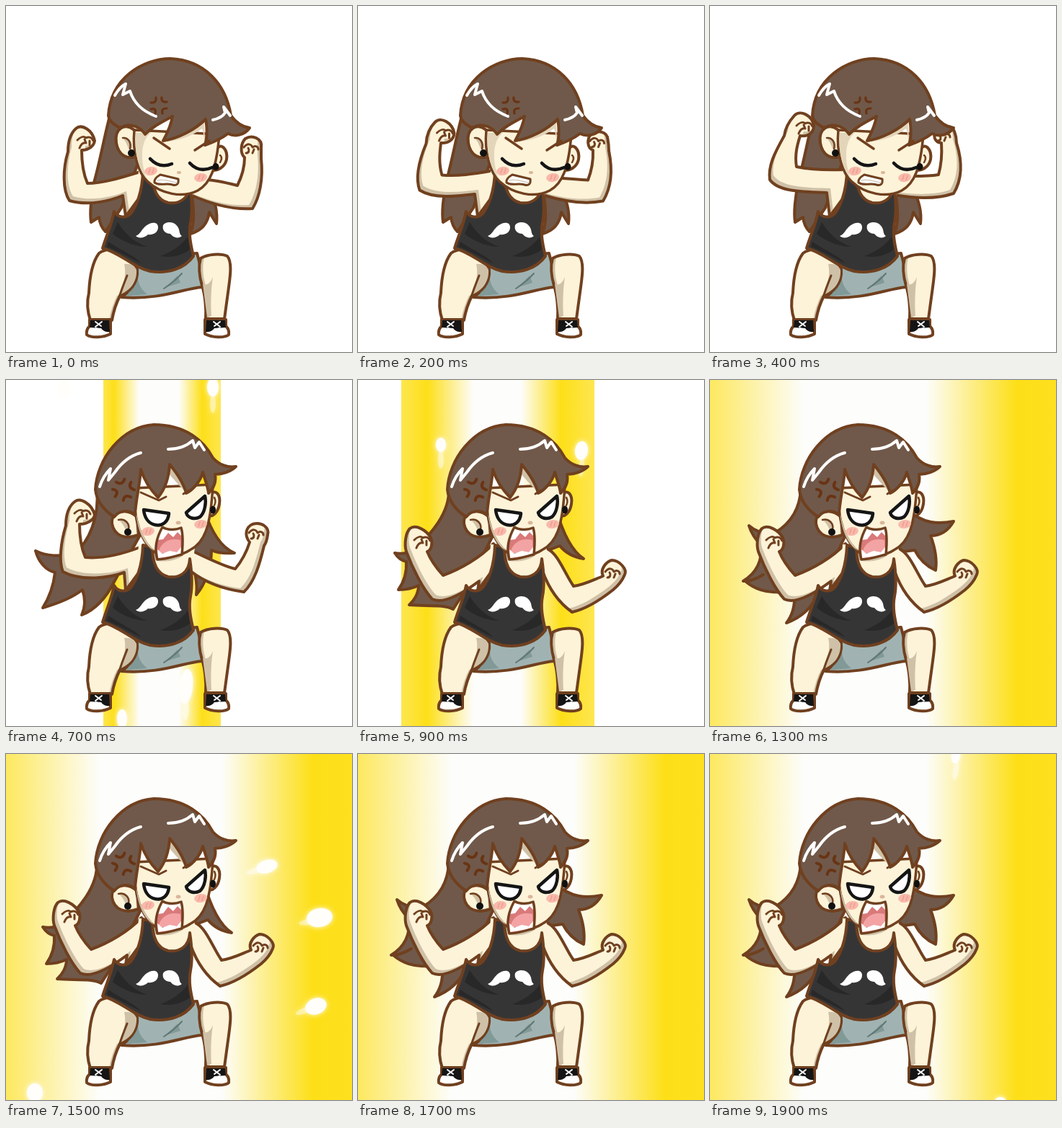
Write an HTML page with a canvas that moves like this. It is 480 by 480 pixels and loops after 2 s.

```html
<!DOCTYPE html>
<html lang="en">
<head>
<meta charset="utf-8">
<title>Power up</title>
<style>
  html, body { margin: 0; width: 100%; height: 100%; overflow: hidden; background: #fff; }
  canvas { display: block; width: 100vw; height: 100vh; }
</style>
</head>
<body>
<canvas id="stage" width="480" height="480"></canvas>
<script>
const ctx = document.getElementById('stage').getContext('2d');
ctx.lineCap = ctx.lineJoin = 'round';

const LINE = '#70401f', SKIN = '#fdf3d9', SHADE = '#cfc1a7', HAIR = '#70594a',
      SHIRT = '#363535', FOLD = '#282828', SHORTS = '#a0b3b2', BLUSH = '#f8b9ab',
      EDGE = '#fee650', YELLOW = '#fddf18', GLOW = '#fdfdfb';

const mix = (a, b, t) => a + (b - a) * t;

function mixPath(a, b, t) {
  const to = b.match(/-?[\d.]+/g);
  let i = 0;
  return a.replace(/-?[\d.]+/g, n => mix(+n, +to[i++], t).toFixed(2));
}

function fill(d, color) {
  ctx.fillStyle = color;
  ctx.fill(new Path2D(d));
}

function line(d, color = LINE, width = 4) {
  ctx.strokeStyle = color;
  ctx.lineWidth = width;
  ctx.stroke(new Path2D(d));
}

function shape(d, color, width = 4) {
  fill(d, color);
  line(d, LINE, width);
}

function oval(x, y, rx, ry, color, tilt = 0) {
  ctx.fillStyle = color;
  ctx.beginPath();
  ctx.ellipse(x, y, rx, ry, tilt, 0, Math.PI * 2);
  ctx.fill();
}

// Skin with a darker rim left uncovered by a shifted copy of the same shape.
function shaded(d, dx, dy) {
  ctx.save();
  ctx.clip(new Path2D(d));
  fill(d, SHADE);
  ctx.translate(dx, dy);
  fill(d, SKIN);
  ctx.restore();
  line(d);
}

function at(x, y, draw) {
  ctx.save();
  ctx.translate(x, y);
  draw();
  ctx.restore();
}

const leftArm = {
  up: { fist: [105, 184], d: 'M186,230 C160,238 135,246 113,246 C106,230 105,215 105,200 C115,200 122,194 123,187 C120,172 105,163 97,170 C88,178 86,190 86,202 C79,225 78,255 88,270 C115,278 145,270 162,263 L166,292 L188,262' },
  tense: { fist: [126, 164], d: 'M186,227 C160,228 140,227 120,223 C117,205 122,190 125,180 C138,182 144,174 144,166 C142,152 125,143 117,152 C108,162 104,172 103,180 C92,200 80,220 83,241 C95,258 130,258 162,259 L166,292 L188,262' },
  yell: { fist: [101, 183], d: 'M186,232 C160,242 132,248 110,246 C103,230 102,215 102,200 C113,200 122,194 123,187 C119,172 103,162 95,169 C85,177 83,190 83,202 C76,225 73,252 79,266 C105,280 145,274 164,267 L166,292 L188,262' },
  low: { fist: [84, 220], d: 'M188,227 C170,246 143,262 118,271 C108,260 100,248 96,238 C102,236 104,226 101,219 C95,208 80,200 72,206 C66,212 64,228 67,238 C76,262 90,290 103,304 C120,312 148,294 168,279 L166,292 L188,262' }
};

const rightArm = {
  up: { fist: [342, 195], d: 'M262,240 C285,240 305,245 321,249 C328,235 331,222 331,210 C324,204 326,190 332,184 C342,178 356,184 354,196 C354,201 354,206 354,212 C357,240 352,265 342,281 C315,283 285,275 256,262' },
  tense: { fist: [325, 178], d: 'M262,236 C285,236 300,237 317,234 C321,220 322,205 321,190 C311,189 309,180 314,172 C322,164 336,165 339,174 C341,179 342,184 342,190 C350,215 350,240 338,260 C315,268 285,267 256,262' },
  yell: { fist: [349, 211], d: 'M252,234 C275,245 300,258 318,262 C328,250 334,238 338,225 C330,215 333,204 342,200 C355,196 366,205 363,215 C362,222 361,226 358,230 C352,255 345,280 330,294 C300,290 275,280 256,265' },
  low: { fist: [355, 265], d: 'M254,231 C276,234 284,264 299,286 C314,284 327,277 340,272 C335,262 345,252 352,250 C362,250 374,262 370,270 C366,280 360,286 354,291 C335,306 315,318 297,322 C280,310 265,290 256,265' }
};

const calmHair = [
  'M150,130 C138,170 132,210 122,245 C118,270 116,285 118,300 L129,293 C130,302 133,308 138,313 L160,280 L190,200Z',
  'M255,250 C262,280 262,300 256,316 C270,312 280,302 282,286 L292,302 C294,285 290,270 280,250Z'
];

const yellHair = [
  [
    'M126,150 C130,190 115,225 95,240 C75,246 55,244 41,237 C45,252 55,264 68,267 C66,285 60,302 51,316 C72,310 92,302 106,291 C110,302 110,315 105,326 C125,318 140,300 150,280 L200,190Z',
    'M275,180 C285,212 298,232 317,240 C303,241 293,240 285,236 C285,262 275,285 264,298 C266,282 262,262 254,245Z'
  ], [
    'M126,150 C128,185 100,215 78,235 C68,241 60,242 51,240 C56,248 62,251 67,252 C68,268 64,280 56,291 C66,291 76,289 84,285 C84,296 78,306 71,312 C95,314 120,311 132,318 L150,290 L200,190Z',
    'M275,180 C285,215 298,238 313,248 C300,246 288,240 280,230 L254,240Z'
  ], [
    'M126,150 C125,180 110,200 90,212 C75,214 63,210 54,202 C58,215 64,222 70,228 C74,250 64,268 46,279 C56,279 66,275 74,270 C66,276 58,278 50,280 C62,290 78,295 92,294 C102,298 110,298 117,298 C118,315 114,327 106,337 C125,330 141,318 150,296 L200,190Z',
    'M275,180 C295,200 318,200 338,196 C330,210 318,216 306,216 C312,232 315,250 313,264 C300,258 290,248 284,236 L254,240Z'
  ]
];

// Beam: left edge, yellow until, white from, white until, yellow from, right edge.
const beamKeys = [
  [6, [175, 183, 202, 238, 256, 270]],
  [7, [135, 150, 185, 240, 272, 298]],
  [9, [60, 96, 160, 226, 282, 328]],
  [11, [-110, -30, 128, 225, 330, 422]],
  [13, [-160, -60, 130, 300, 425, 900]]
];

// step, x, y, radii, tilt
const sparks = [
  [7, 287, 10, 8, 13, 0], [7, 250, 425, 9, 24, .1], [7, 161, 470, 7, 13, 0], [7, 80, 12, 9, 15, .1],
  [9, 115, 90, 7, 10, 0], [9, 310, 98, 9, 13, .1],
  [11, 100, 118, 13, 17, .3], [11, 29, 242, 8, 13, .3], [11, 11, 284, 9, 21, .2],
  [11, 15, 443, 10, 18, .2], [11, 92, 356, 15, 20, 0], [11, 322, 387, 7, 13, .3],
  [15, 362, 156, 9, 15, 1.3], [15, 435, 227, 13, 18, 1.4], [15, 430, 350, 11, 15, 1.2], [15, 40, 470, 11, 13, 0],
  [19, 341, 3, 6, 10, .2], [19, 403, 480, 7, 4, 0]
];

function beam(step) {
  if (step < 6) return;
  let i = 0;
  while (i < beamKeys.length - 2 && step >= beamKeys[i + 1][0]) i++;
  const [s0, from] = beamKeys[i], [s1, to] = beamKeys[i + 1];
  const t = Math.min(1, (step - s0) / (s1 - s0));
  const xs = from.map((x, n) => mix(x, to[n], t));
  const left = xs[0], right = xs[5];
  const paint = ctx.createLinearGradient(left, 0, right, 0);
  [EDGE, YELLOW, GLOW, GLOW, YELLOW, EDGE].forEach((color, n) =>
    paint.addColorStop((xs[n] - left) / (right - left), color));
  ctx.fillStyle = paint;
  ctx.fillRect(left, 0, right - left, 480);
}

function drawSparks(step) {
  ctx.save();
  ctx.shadowColor = '#fff';
  ctx.shadowBlur = 7;
  for (const [s, x, y, rx, ry, tilt] of sparks) {
    const age = step - s;
    if (Math.abs(age) > 1) continue;
    const px = x + age * 8 * Math.sign(x - 215), py = y - age * 190;
    oval(px, py, rx, ry, '#fffefa', tilt);
    const [tx, ty] = tilt > 1 ? [-16, 6] : [0, ry + 10];
    oval(px + tx, py + ty, 4, 13, 'rgba(255,255,255,.4)', tilt);
  }
  ctx.restore();
}

function drawArm(poses, from, to, t, dx, dy, knuckles) {
  const a = poses[from], b = poses[to];
  shaded(mixPath(a.d, b.d, t), dx, dy);
  at(mix(a.fist[0], b.fist[0], t), mix(a.fist[1], b.fist[1], t), () => line(knuckles, LINE, 3));
}

function drawArms(step) {
  let pose = ['low', 'low', 0];
  if (step < 7) pose = ['up', 'tense', step <= 4 ? step / 4 : (6 - step) / 2];
  else if (step < 9) pose = ['yell', 'low', (step - 7) / 2];
  drawArm(leftArm, ...pose, 5, -6, 'M-6,2 C-2,-2 3,-4 6,-1 C10,-3 14,-2 16,3 M-3,13 C-1,8 2,5 6,6 M6,6 L4,1 M11,9 L11,3');
  drawArm(rightArm, ...pose, -5, -5, 'M-12,1 C-7,-5 -2,-4 0,1 C4,-2 8,0 8,4 M-9,9 C-5,9 -4,5 -6,2 M0,9 L2,4');
}

function shoe(x, flip) {
  ctx.save();
  ctx.translate(x, 0);
  ctx.scale(flip, 1);
  shape('M-14,435 L15,435 L15,455 C5,460 -12,461 -18,456 C-19,450 -16,446 -14,444Z', '#fff', 4);
  fill('M-13,436 L13,436 L14,452 C8,453 4,450 2,447 L-14,446Z', '#151515');
  line('M-6,438 L2,444 M3,438 L-6,445 M-5,447 L3,451', '#fff', 2);
  ctx.restore();
}

function drawBody() {
  fill('M184,228 L262,232 L256,285 L180,285Z', SKIN);
  fill('M200,236 L250,240 C240,250 222,254 207,250Z', SHADE);

  shape('M180,350 L265,343 C270,360 272,378 272,390 C245,392 215,408 160,404 C175,395 184,380 180,352Z', SHORTS);
  fill('M182,374 C184,388 188,393 196,400 L168,402Z M238,374 L222,390 L242,384Z', '#819997');
  line('M244,371 C236,380 228,386 219,392', '#607773', 2);

  shaded('M117,436 C113,424 112,410 115,398 C116,375 120,355 129,343 C145,331 173,343 182,365 C184,385 170,398 158,402 C153,412 149,424 147,436Z', -4, 0);
  fill('M181,366 C182,384 171,395 159,400 C161,388 168,376 164,358 C173,357 178,360 181,366Z', SHADE);
  line('M168,374 C164,384 160,394 157,404', LINE, 3);
  shaded('M277,434 C278,420 276,400 272,388 C268,375 267,360 270,350 C280,344 298,343 307,347 C314,355 311,375 309,390 C307,405 305,420 303,434Z', 5, 0);
  fill('M273,386 C280,388 284,383 287,376 C284,395 284,415 285,430 L279,432Z', SHADE);
  shoe(130, 1);
  shoe(291, -1);

  shape('M190,229 C189,258 181,278 173,288 C166,295 155,294 150,285 C146,305 138,322 134,336 C158,342 175,362 200,368 C225,372 248,364 260,347 C256,330 253,315 256,300 C259,285 258,268 255,248 C254,268 240,275 225,273 C209,269 203,254 203,232Z', SHIRT);
  fill('M155,300 C168,320 180,328 196,334 C178,334 160,326 148,316Z M252,320 C244,332 228,342 214,347 C232,350 246,345 255,338Z M142,327 C158,338 176,345 188,357 C172,350 156,340 140,334Z', FOLD);
  fill('M180,319 C186,317 188,310 194,305 C202,299 211,299 211,307 C211,315 203,318 197,317 C192,322 184,323 180,319Z M218,304 C222,298 236,298 240,310 C241,316 242,318 244,319 C240,323 232,322 228,316 C222,316 216,312 218,304Z', '#fff');
}

function anger(x, y, size, tilt) {
  at(x, y, () => {
    ctx.rotate(tilt);
    ctx.scale(size, size);
    line('M-11,-4 Q-3,-3 -4,-11 M4,-11 Q3,-4 11,-5 M-11,5 Q-3,3 -5,11 M5,11 Q3,4 11,4', '#693414', 3.2);
  });
}

function blush(x, y) {
  oval(x, y, 9, 6, BLUSH, -.15);
  line(`M${x - 3},${y + 3} l2,-6 M${x + 2},${y + 3} l2,-6`, '#ee9d8e', 1.5);
}

function calmHead() {
  shaded('M180,174 C165,160 150,170 153,190 C156,208 170,214 182,208Z', -3, -2);
  shaded('M290,200 C299,187 308,200 306,213 C303,225 293,228 287,228Z', 2, -2);
  fill('M163,185 C172,181 177,190 174,202 C168,198 169,190 163,185Z', SHADE);
  line('M162,183 C170,182 174,190 172,198 M297,207 Q301,210 297,217', LINE, 2.5);
  shape('M178,172 C175,205 184,232 196,243 C215,261 245,267 266,256 C284,246 292,225 296,178Z', SKIN, 3.5);
  fill('M180,176 L202,175 C186,186 186,215 195,239 C184,225 178,205 180,176Z M217,188 C225,178 229,168 231,157 L275,160 L276,191 C274,182 274,174 272,170 C256,182 236,188 217,188Z', '#e2d5ba');
  shape('M158,169 C150,164 144,162 142,152 C145,100 190,73 228,73 C275,75 305,108 312,152 C320,163 329,168 338,169 C331,179 318,182 308,177 C299,184 288,189 276,193 C280,180 279,168 277,157 C262,172 238,184 218,187 C224,176 229,165 231,153 C215,162 202,168 193,178 C188,170 174,160 158,169Z', HAIR);
  line('M151,124 C155,117 160,111 166,108 L162,123 L172,118 C178,137 192,147 208,153', '#fff', 4);
  line('M287,158 C296,156 301,153 304,148 L302,140 L311,152', '#fff', 4);
  anger(212, 138, 1, 0);
  line('M205,183 L227,198 M282,187 L262,200', LINE, 3.5);
  line('M200,212 Q213,226 230,219 M255,218 Q268,232 286,224', '#151515', 4.5);
  blush(201, 229);
  blush(270, 238);
  oval(240, 231, 3, 2, '#d9b79a');
  shape('M214,234 L239,240 C240,246 237,250 231,248 C222,245 213,250 206,245 C205,241 209,237 214,234Z', '#fff', 3);
  line('M210,242 C220,239 229,244 237,245', '#d6cfc4', 1.5);
  oval(174, 204, 5, 5, '#111');
  oval(291, 223, 4.5, 5, '#111');
}

function yellHead() {
  shaded('M182,190 C167,177 146,181 147,199 C150,216 165,222 184,215Z', -3, -2);
  shaded('M282,160 C291,149 298,160 296,172 C294,185 286,190 282,188Z', 2, -2);
  fill('M157,195 C168,190 174,200 170,212 C164,207 164,200 157,195Z', SHADE);
  line('M156,194 C165,192 172,199 170,207 M289,163 Q292,168 289,174', LINE, 2.5);
  shape('M178,150 C176,195 188,226 208,240 C225,246 245,243 255,236 C275,226 284,205 287,145Z', SKIN, 3.5);
  fill('M180,178 C183,205 192,222 206,237 C192,230 181,208 180,178Z M227,118 C238,130 244,142 248,154 C238,144 231,136 226,130Z', SHADE);
  shape('M150,190 C138,182 126,170 124,152 C126,110 160,65 205,62 C250,62 275,85 287,108 C296,118 308,122 319,120 C312,127 300,131 290,131 C292,142 288,150 281,157 C280,148 276,138 273,128 C270,140 260,152 250,157 C246,142 236,128 227,117 C226,135 220,152 211,163 C200,152 192,140 187,124 C186,145 180,165 179,187 C170,180 158,180 150,190Z', HAIR);
  line('M130,148 C133,138 139,129 145,123 L142,139 L151,128 C160,115 172,105 187,101', '#fff', 4);
  line('M225,96 C240,96 250,92 259,84 L262,94 L268,86 L275,97', '#fff', 4);
  anger(163, 152, 1.25, .45);
  line('M187,156 L212,167 L222,162 M246,158 L254,153', LINE, 3);
  const eyes = 'M191,180 L226,185 C225,197 217,203 207,201 C197,199 192,190 191,180Z M276,161 L250,184 C252,192 262,194 269,190 C276,184 278,170 276,161Z';
  fill(eyes, '#fff');
  line(eyes, '#151515', 4.5);
  blush(197, 210);
  blush(270, 200);
  oval(239, 198, 3.5, 2.5, '#d9b79a');
  const mouth = 'M217,204 C225,209 236,208 243,205 C246,215 245,232 244,242 C232,245 222,249 210,249 C206,236 208,220 217,204Z';
  fill(mouth, '#d9797a');
  fill('M211,240 C214,226 226,218 242,222 L243,240Z', '#f3a3a4');
  fill('M217,206 C225,210 236,209 242,206 L244,217 L238,211 L232,218 L225,212 L218,221 L210,222Z M211,247 L210,235 L217,241 L227,237 L237,239 L243,232 L243,242Z', '#fff');
  line(mouth, LINE, 3.5);
  oval(169, 211, 5, 5, '#111');
  oval(287, 180, 4, 5.5, '#111');
}

function draw(step) {
  const yelling = step >= 7;
  ctx.fillStyle = '#fff';
  ctx.fillRect(0, 0, 480, 480);
  beam(step);
  if (yelling) drawSparks(step);
  const sway = step === 7 ? 0 : step % 3 ? 2 : 1;
  (yelling ? yellHair[sway] : calmHair).forEach(d => shape(d, HAIR));
  drawArms(step);
  drawBody();
  yelling ? yellHead() : calmHead();
}

const start = performance.now();
function tick() {
  draw(Math.floor((performance.now() - start) % 2000 / 100));
  requestAnimationFrame(tick);
}
tick();
</script>
</body>
</html>
```
